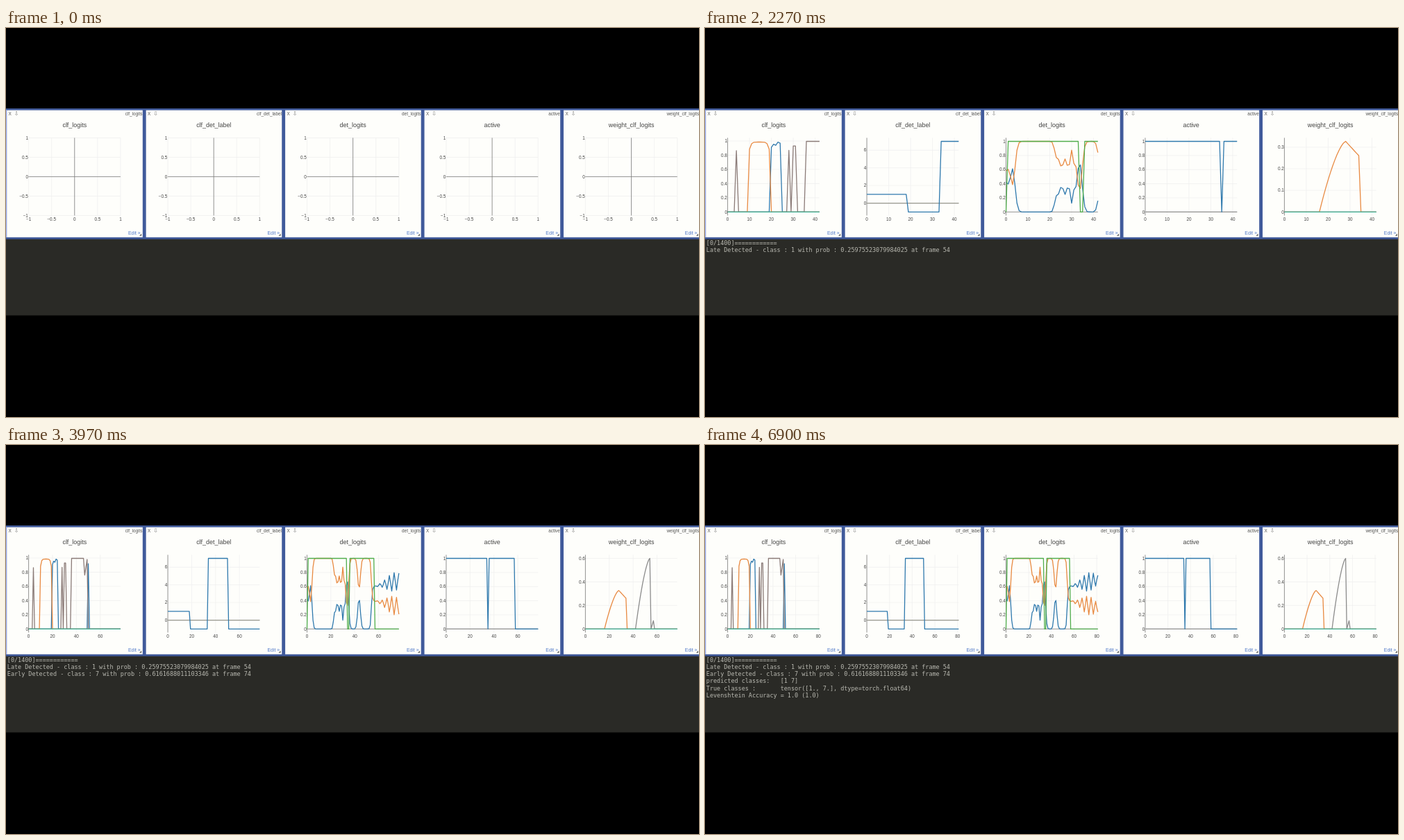
An HTML page that plays this animation: 998x561 px, repeating every 6930 ms.

```html
<!DOCTYPE html>
<html lang="en">
<head>
<meta charset="utf-8">
<title>Live detection plots</title>
<style>
  html, body { margin: 0; width: 100%; height: 100%; overflow: hidden; background: #000; }
  svg { display: block; width: 998px; height: 561px; }
  text { font-family: "Liberation Sans", Arial, sans-serif; fill: #444; }
  .title { font-size: 8.95px; }
  .bar { font-size: 6.4px; fill: #555; }
  .tick { font-size: 6.32px; }
  .edit { font-size: 6.9px; fill: #5079c8; }
  .icon { font: 8.5px "DejaVu Sans", sans-serif; fill: #888; }
  .log { font: 8.46px "DejaVu Sans Mono", monospace; fill: #b9b9b1; white-space: pre; }
  .grid { stroke: #eee; stroke-width: .7; }
  .zero { stroke: #808080; stroke-width: .85; }
  polyline { fill: none; stroke-width: 1.3; stroke-linejoin: round; }
</style>
</head>
<body>
<svg id="stage" viewBox="0 0 998 561"></svg>
<script>
const LOOP = 6930, STEP = 200.45;
const PANE_LAG = 6; // ms between the refresh of one pane and the next
const BOX = { x: 32.6, y: 158.4, w: 132.3, h: 112 };
const BLUE = '#2f79ad', ORANGE = '#e88a42', GREEN = '#50ad4c',
      BROWN = '#8b7b78', GRAY = '#8c8c8c', TEAL = '#43b398';

// Signals over the sample index i
const zero = () => 0;
const sum = (...parts) => i => parts.reduce((total, f) => total + f(i), 0);
const hold = (from, to, v) => i =>
  i < from || i > to ? 0 : typeof v === 'function' ? v(i) : v;
const bump = (center, width, height) => i =>
  height * Math.exp(-(((i - center) / width) ** 2));
const climb = (from, to, peak) => i => peak * (1 - (1 - (i - from) / (to - from)) ** 1.5);

const ripple = i => bump(73, 9, .13)(i) * Math.cos(Math.PI * (i - 73) / 2);
const settle = i => (.6 + .004 * (i - 56) + ripple(i)) / (1 + Math.exp(2.5 * (53.9 - i)));
const detect = sum(
  bump(0, 1.6, .4), bump(3, 1.6, .6),
  bump(22.8, 1, .15), bump(25.4, 2, .36), bump(28.6, 1.2, .35),
  bump(31.2, .8, .27), bump(33.6, 1.6, .71), bump(43.6, 1.6, .43), settle);

const panes = [
  { name: 'clf_logits', series: [
    [BLUE, sum(hold(20, 24, i => .91 + .03 * (i % 2) + .015 * (i - 20)), hold(50, 50, .92))],
    [ORANGE, hold(10, 19, i => .985 - .1 * ((i - 14.5) / 4.5) ** 6)],
    [BROWN, sum(hold(4, 4, .865), hold(28, 28, .87), hold(30, 31, .93),
      hold(36, 46, .995), hold(47, 49, i => .76 + .11 * (i - 47)))],
    [TEAL, zero]] },
  { name: 'clf_det_label', series: [
    ['#999990', zero],
    [BLUE, sum(hold(0, 18, 1), hold(19, 33, -1), hold(34, 50, 7), hold(51, Infinity, -1))]] },
  { name: 'det_logits', series: [
    [BLUE, detect],
    [ORANGE, i => 1 - detect(i)],
    [GREEN, sum(hold(1, 33, 1), hold(36, 56, 1))]] },
  { name: 'active', series: [
    ['#999', zero],
    [BLUE, sum(hold(0, 34, 1), hold(36, 57, 1))]] },
  { name: 'weight_clf_logits', series: [
    [ORANGE, sum(hold(16, 28, climb(16, 28, .327)), hold(29, 34, i => .327 - .011 * (i - 28)))],
    [GRAY, sum(hold(42, 54, climb(42, 54, .6)), hold(56, 57, i => .035 * (i - 55)))],
    [TEAL, zero]] }
];

const log = [
  [300, '[0/1400]============'],
  [1860, 'Late Detected - class : 1 with prob : 0.25975523079984025 at frame 54'],
  [2780, 'Early Detected - class : 7 with prob : 0.6161688011103346 at frame 74'],
  [4250, 'predicted classes:   [1 7]'],
  [4250, 'True classes :       tensor([1., 7.], dtype=torch.float64)'],
  [4250, 'Levenshtein Accuracy = 1.0 (1.0)']
];

// Number of samples received by a given time
const pace = [[90, 0], [1510, 28], [2940, 56], [3540, 71], [4200, 81]];
function samplesAt(t) {
  const k = pace.findIndex(([time]) => t < time);
  if (k === 0) return 0;
  if (k < 0) return pace[pace.length - 1][1];
  const [[t0, n0], [t1, n1]] = [pace[k - 1], pace[k]];
  return Math.floor(n0 + (n1 - n0) * (t - t0) / (t1 - t0));
}

const text = (cls, x, y, str, anchor = 'start') =>
  `<text class="${cls}" x="${x}" y="${y}" text-anchor="${anchor}">${str}</text>`;
const line = (cls, x1, y1, x2, y2) =>
  `<line class="${cls}" x1="${x1}" y1="${y1}" x2="${x2}" y2="${y2}"/>`;
const rect = (x, y, w, h, fill) =>
  `<rect x="${x}" y="${y}" width="${w}" height="${h}" fill="${fill}"/>`;

// Round tick values inside a range, spaced 1, 2 or 5 times a power of ten
function ticks(lo, hi, count) {
  const rough = (hi - lo) / count;
  const base = 10 ** Math.floor(Math.log10(rough));
  const step = base * [1, 2, 5, 10].find(m => m * base >= rough - 1e-9);
  const out = [];
  for (let k = Math.ceil(lo / step - 1e-9); k <= hi / step + 1e-9; k++) out.push(+(k * step).toFixed(4));
  return out;
}
const label = v => String(v).replace('-', '\u2212');

function plot(pane, n) {
  const { x, y, w, h } = BOX;
  const empty = n < 1;
  const x0 = empty ? -1 : 0, x1 = empty ? 1 : n;
  const data = empty ? [] : pane.series.map(([color, f]) =>
    [color, Array.from({ length: n + 1 }, (_, i) => f(i))]);
  const all = data.flatMap(d => d[1]);
  let lo = Math.min(...all), hi = Math.max(...all);
  if (empty || lo === hi) { lo = -1; hi = 1; }
  else { const pad = (hi - lo) * .05; lo -= pad; hi += pad; }

  const px = v => +(x + (v - x0) / (x1 - x0) * w).toFixed(2);
  const py = v => +(y + (hi - v) / (hi - lo) * h).toFixed(2);
  let grid = '', axes = '', labels = '';
  for (const v of ticks(x0, x1, 5)) {
    const mark = line(v ? 'grid' : 'zero', px(v), y, px(v), y + h);
    if (v) grid += mark; else axes += mark;
    labels += text('tick', px(v), 277.6, label(v), 'middle');
  }
  for (const v of ticks(lo, hi, 6.3)) {
    const mark = line(v ? 'grid' : 'zero', x, py(v), x + w, py(v));
    if (v) grid += mark; else axes += mark;
    labels += text('tick', x - .7, py(v) + 2.2, label(v), 'end');
  }
  const lines = data.map(([color, vals]) =>
    `<polyline stroke="${color}" points="${vals.map((v, i) => px(i) + ',' + py(v)).join(' ')}"/>`);
  return grid + axes + lines.join('') + labels;
}

const frame = (pane, i) => `<g transform="translate(${STEP * i})">`
  + rect(1.2, 118.6, 195.6, 183.2, '#fefefb')
  + text('bar', 3.6, 126, 'X') + text('icon', 11.6, 126.2, '\u21e9')
  + text('bar', 196.5, 126, pane.name, 'end')
  + text('title', 98.8, 142.8, pane.name, 'middle')
  + text('edit', 176, 297.8, 'Edit \u00bb')
  + '<path d="M195.2 296.6v3.2h-3.2z" fill="#666"/><g class="plot"></g></g>';

const stage = document.getElementById('stage');
stage.innerHTML = rect(0, 116, 998, 189, '#405a9b')
  + rect(0, 118, 1.2, 184, '#93a5ea')
  + rect(0, 304.6, 998, 109.9, '#2a2a26')
  + panes.map(frame).join('')
  + log.map(([, str], i) => text('log', 1.8, 313 + i * 10.13, str)).join('');

const plots = stage.querySelectorAll('.plot');
const rows = stage.querySelectorAll('.log');
const shown = [];

function draw() {
  const t = performance.now() % LOOP;
  panes.forEach((pane, i) => {
    const n = samplesAt(t - i * PANE_LAG);
    if (n === shown[i]) return;
    plots[i].innerHTML = plot(pane, n);
    shown[i] = n;
  });
  log.forEach(([start], i) => { rows[i].style.visibility = t >= start ? 'visible' : 'hidden'; });
  requestAnimationFrame(draw);
}
draw();
</script>
</body>
</html>
```
